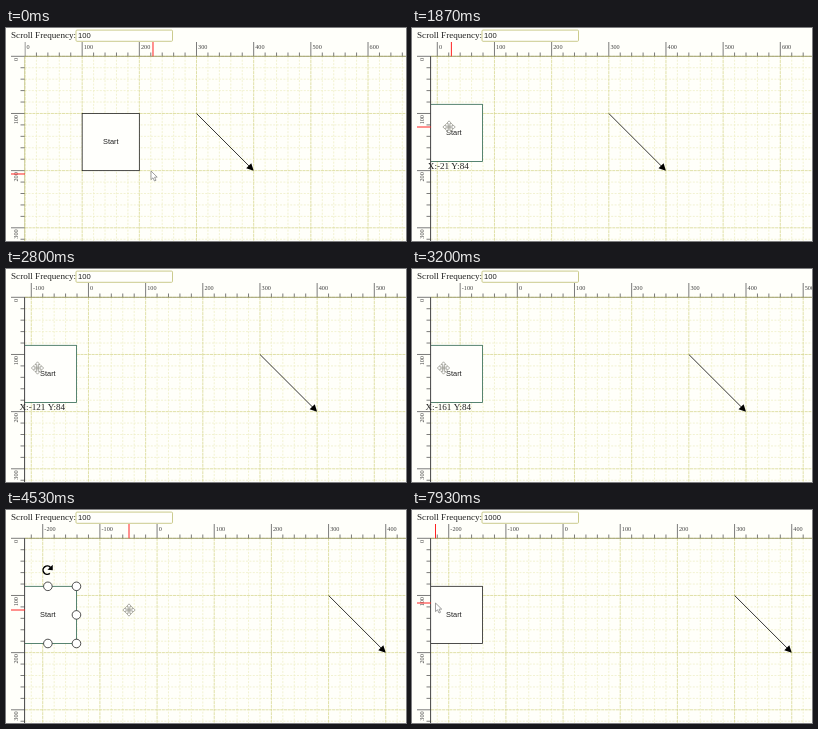
Recreate the animation shown at these times as an HTML page with a canvas. Size 400x213 px, loop 8000 ms.

```html
<!DOCTYPE html>
<html lang="en">
<head>
<meta charset="utf-8">
<title>Auto-scrolling diagram with rulers</title>
<style>
  html, body { margin: 0; width: 100%; height: 100%; overflow: hidden; background: #fffffa; }
  canvas { display: block; width: 400px; height: 213px; }
</style>
</head>
<body>
<canvas id="stage"></canvas>
<script>
const W = 400, H = 213, LOOP = 8000;
const LEFT = 19, TOP = 28.3, UNIT = 0.5717;   // ruler edges, pixels per diagram unit
const PRESS = 930, RELEASE = 4050, DESELECT = 4870;
const MARK_LAG = 60;                          // ruler marks trail the pointer
const SERIF = '"Liberation Serif", serif', SANS = '"Liberation Sans", sans-serif';

const canvas = document.getElementById('stage');
const dpr = window.devicePixelRatio || 1;
canvas.width = W * dpr;
canvas.height = H * dpr;
const c = canvas.getContext('2d');

// [time, x, y]
const mousePath = [
  [-60, 147, 146], [0, 145, 143], [200, 143, 141], [750, 101, 109], [950, 100, 108],
  [1720, 43, 99], [1880, 37, 99], [2000, 31.5, 99], [4080, 31.5, 99],
  [4470, 123, 100], [4560, 123, 100], [5150, 107, 7.5], [7400, 107, 7.5],
  [7400, 145, 143], [7869, 145, 143], [7870, 23.5, 93], [LOOP, 23.5, 93]
];
const dragPath = [[PRESS, 100, 100], [1720, -10, 84]];

function along(path, t) {
  if (t <= path[0][0]) return path[0].slice(1);
  for (let i = 1; i < path.length; i++) {
    const [t0, x0, y0] = path[i - 1], [t1, x1, y1] = path[i];
    if (t < t1) {
      let k = (t - t0) / (t1 - t0);
      k = k * k * (3 - 2 * k);
      return [x0 + (x1 - x0) * k, y0 + (y1 - y0) * k];
    }
  }
  return path[path.length - 1].slice(1);
}

// The view scrolls ten units per timer tick while the pointer rests near the edge.
function scrolled(t) {
  const ticks = Math.min(23, Math.floor((t - 1782) / 98) + 1);
  return ticks > 0 ? 1 + 10 * ticks : 0;
}

function line(x0, y0, x1, y1, color, width = 0.7, dash = []) {
  c.strokeStyle = color;
  c.lineWidth = width;
  c.setLineDash(dash);
  c.beginPath();
  c.moveTo(x0, y0);
  c.lineTo(x1, y1);
  c.stroke();
  c.setLineDash([]);
}

function text(s, x, y, size, family, color = '#222', align = 'left') {
  c.font = `${size}px ${family}`;
  c.fillStyle = color;
  c.textAlign = align;
  c.fillText(s, x, y);
}

function polygon(points, fill, stroke, width = 0.7) {
  c.beginPath();
  points.forEach(([x, y]) => c.lineTo(x, y));
  c.closePath();
  c.fillStyle = fill;
  c.fill();
  if (stroke) {
    c.strokeStyle = stroke;
    c.lineWidth = width;
    c.stroke();
  }
}

function clipped(x, y, draw) {
  c.save();
  c.beginPath();
  c.rect(x, y, W - x, H - y);
  c.clip();
  draw();
  c.restore();
}

function grid(x0) {
  for (const major of [false, true]) {
    const color = major ? '#d9d994' : '#efefc8';
    const dash = major ? [3, 0.7] : [2, 1.4];
    for (let u = -240; u <= 700; u += 20) {
      if ((u % 100 === 0) !== major) continue;
      const x = x0 + u * UNIT, y = TOP + u * UNIT;
      if (x >= LEFT && x < W) line(x, TOP, x, H, color, 0.8, dash);
      if (y >= TOP && y < H) line(LEFT, y, W, y, color, 0.8, dash);
    }
  }
}

function rulers(x0, edge) {
  clipped(LEFT - 0.5, 14, () => {
    for (let u = -240; u <= 700; u += 20) {
      const x = x0 + u * UNIT, major = u % 100 === 0;
      line(x, major ? 14 : 24.5, x, TOP, '#444');
      if (major) text(u, x + 1.6, 21, 6.2, SERIF, '#444');
    }
  });
  for (let u = 0; u <= 320; u += 20) {
    const y = TOP + u * UNIT, major = u % 100 === 0;
    line(major ? 5 : 14.5, y, LEFT, y, '#444');
    if (major) {
      c.save();
      c.translate(12, y + 1.6);
      c.rotate(-Math.PI / 2);
      text(u, 0, 0, 6.2, SERIF, '#444', 'right');
      c.restore();
    }
  }
  line(LEFT, TOP, W, TOP, '#90905e', 0.8);
  line(LEFT - 0.4, TOP, LEFT - 0.4, H, edge ? '#444' : '#b9b978', edge ? 1 : 0.6);
}

function arrow(x0) {
  const x = x0 + 300 * UNIT, y = TOP + 100 * UNIT, d = 100 * UNIT;
  line(x, y, x + d - 3, y + d - 3, '#000', 0.8);
  c.save();
  c.translate(x + d, y + d);
  c.rotate(Math.PI / 4);
  polygon([[0, 0], [-7, -3.6], [-7, 3.6]], '#000');
  c.restore();
}

function node(x, y, active, handles) {
  const s = 100 * UNIT, mid = x + s / 2;
  c.fillStyle = '#fffffc';
  c.fillRect(x, y, s, s);
  c.strokeStyle = active ? '#2f6650' : '#222';
  c.lineWidth = 0.8;
  c.strokeRect(x, y, s, s);
  text('Start', mid, y + s / 2 + 2, 7.4, SANS, '#222', 'center');
  if (!handles) return;

  for (let i = 0; i < 9; i++) {
    if (i === 4) continue;
    c.beginPath();
    c.arc(x + (i % 3) * s / 2, y + Math.floor(i / 3) * s / 2, 4.3, 0, 7);
    c.fillStyle = '#fff';
    c.fill();
    c.strokeStyle = '#222';
    c.lineWidth = 0.8;
    c.stroke();
  }
  c.beginPath();
  c.arc(mid - 0.6, y - 16.2, 4.2, 0.9, 5.6);
  c.strokeStyle = '#000';
  c.lineWidth = 1.5;
  c.stroke();
  polygon([[mid + 4.9, y - 21.5], [mid + 4.9, y - 16], [mid - 0.4, y - 16.6]], '#000');
}

function field(value, focused) {
  text('Scroll Frequency:', 5, 9.6, 9.14, SERIF);
  c.beginPath();
  c.roundRect(70, 2.1, 96.5, 11.2, 1);
  c.fillStyle = '#fffffc';
  c.fill();
  c.strokeStyle = focused ? '#222' : '#c6c680';
  c.lineWidth = focused ? 1.4 : 0.9;
  c.stroke();
  text(value, 72, 10.1, 7.62, SANS);
  if (!focused) return;
  const caret = 72.8 + c.measureText(value).width;
  line(caret, 4, caret, 12, '#000');
  polygon([[158.3, 7], [162.3, 7], [160.3, 4.7]], '#77773c');
  polygon([[158.3, 9], [162.3, 9], [160.3, 11.3]], '#77773c');
}

function cursor(kind, x, y) {
  c.save();
  c.translate(x, y);
  if (kind === 'arrow') {
    polygon([[0, 0], [0, 8.6], [2, 6.8], [3.5, 10], [5, 9.3], [3.6, 6.2], [6.2, 6.1]], '#fff', '#777');
  } else if (kind === 'text') {
    line(0, -4, 0, 4, '#222', 0.9);
    line(-2, -4.3, 2, -4.3, '#222', 0.8);
    line(-2, 4.3, 2, 4.3, '#222', 0.8);
  } else {
    for (let i = 0; i < 4; i++) {
      polygon([[0, -6.2], [2.5, -3.4], [0.8, -3.4], [0.8, -0.8], [-0.8, -0.8], [-0.8, -3.4], [-2.5, -3.4]],
        '#fff', '#77776c', 0.6);
      c.rotate(Math.PI / 2);
    }
  }
  c.restore();
}

function draw(t) {
  const offset = scrolled(t), x0 = LEFT + offset * UNIT;
  const [mx, my] = along(mousePath, t);
  const [vx, vy] = along(dragPath, t);
  const dragging = t >= PRESS && t < RELEASE;
  const selected = t >= RELEASE && t < DESELECT;
  const inField = my < 14;
  const focused = t >= 5150 && t < 7000;

  c.setTransform(dpr, 0, 0, dpr, 0, 0);
  c.fillStyle = '#fffffa';
  c.fillRect(0, 0, W, H);

  grid(x0);
  clipped(LEFT, TOP, () => {
    arrow(x0);
    node(LEFT + vx * UNIT, TOP + vy * UNIT, dragging || selected, selected);
  });
  rulers(x0, t > 600 && (t < 5000 || t >= 7400));

  const [markX, markY] = along(mousePath, t - MARK_LAG);
  if (markY > TOP && !(t > 1960 && t < RELEASE)) {
    line(markX, 14, markX, TOP, '#f22', 1);
    line(5, markY, LEFT, markY, '#f22', 1);
  }
  if (dragging) {
    const label = `X:${Math.round(vx - offset)} Y:${Math.round(vy)}`;
    text(label, LEFT + vx * UNIT + 23, TOP + vy * UNIT + 64.6, 9.14, SERIF, '#222', 'center');
  }

  field(t >= 6530 ? '1000' : '100', focused);
  if (t < 7000 || t >= 7400) {
    const kind = inField ? 'text' : t > 800 && t < 4700 ? 'move' : 'arrow';
    cursor(kind, mx, my);
  }
}

const start = performance.now();
function frame() {
  draw((performance.now() - start) % LOOP);
  requestAnimationFrame(frame);
}
frame();
</script>
</body>
</html>
```
